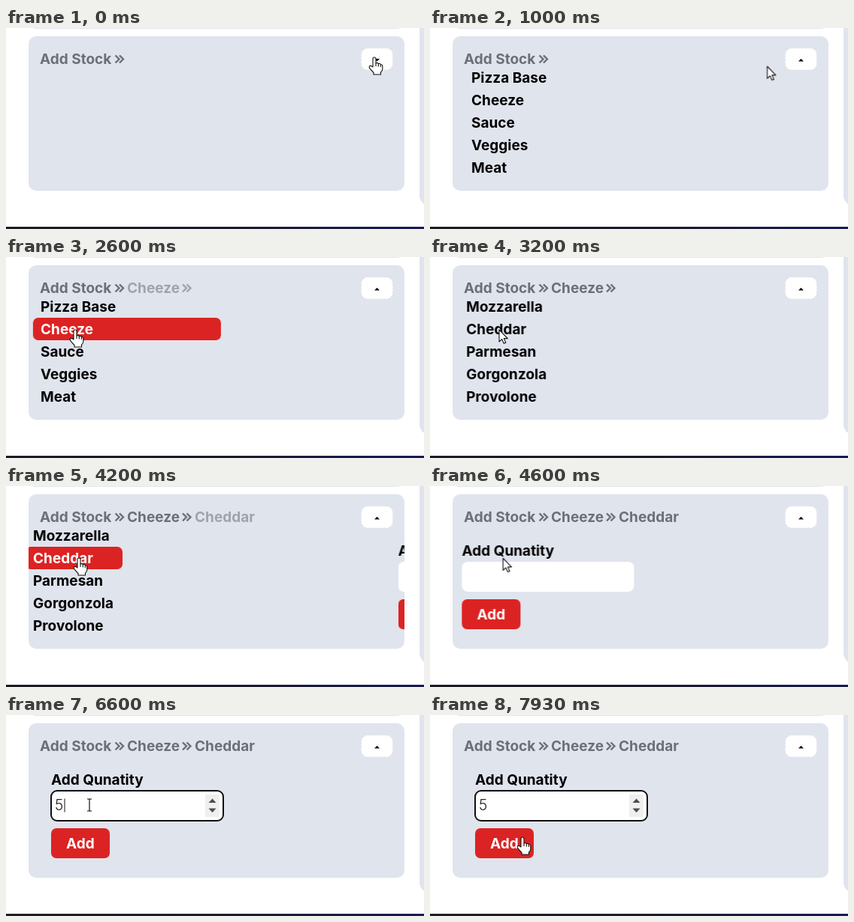
An HTML page for the animation above (8 s loop, 556 by 268 pixels).

```html
<!DOCTYPE html>
<html lang="en">
<head>
<meta charset="utf-8">
<title>Add stock</title>
<style>
  html, body { margin: 0; width: 100%; height: 100%; overflow: hidden; background: #fff; }
  svg { display: block; width: 556px; height: 268px; }
  text { font: 700 19px Inter, "Open Sans", sans-serif; }
  .crumb { fill: #6c6f79; }
  .chevron { fill: none; stroke: #6c6f79; stroke-width: 2.4; }
  .red { fill: #dc2323; }
  .light { fill: #fff; }
  .cursor { fill: #fff; stroke: #111; stroke-width: 1.1; stroke-linejoin: round; }
</style>
</head>
<body>
<svg viewBox="0 0 556 268">
  <defs>
    <linearGradient id="footer">
      <stop offset="0" stop-color="#1d1b22"/>
      <stop offset=".55" stop-color="#1b1a2c"/>
      <stop offset="1" stop-color="#171a55"/>
    </linearGradient>
    <clipPath id="card"><rect x="30" y="11" width="500" height="206" rx="10"/></clipPath>
  </defs>

  <g fill="#e0e4ed">
    <rect x="30" y="-40" width="500" height="41" rx="10"/>
    <rect x="550" y="-40" width="60" height="277" rx="14"/>
    <rect x="30" y="11" width="500" height="206" rx="10"/>
  </g>
  <rect y="265" width="556" height="3" fill="url(#footer)"/>

  <g class="crumb">
    <text x="45" y="48">Add Stock</text>
    <path class="chevron" d="M145.500 36.500l5 5-5 5m5.500-10l5 5-5 5"/>
    <g id="crumb2">
      <text x="161" y="48">Cheeze</text>
      <path class="chevron" d="M235 36.500l5 5-5 5m5.500-10l5 5-5 5"/>
    </g>
    <text id="crumb3" x="251" y="48">Cheddar</text>
  </g>

  <rect x="473" y="27.500" width="41" height="28" rx="8" fill="#fff" stroke="#fff" stroke-dasharray="3 2"/>
  <path id="down" d="M490 41h7l-3.500 3.500z"/>
  <path id="up" d="M490 44.500h7l-3.500-3.500z"/>

  <g clip-path="url(#card)">
    <g id="kinds"></g>
    <g id="cheeses"></g>
    <g id="form">
      <text x="60" y="92.500">Add Qunatity</text>
      <rect x="60" y="101" width="229" height="40" rx="8" fill="#fff"/>
      <g id="spinner">
        <rect x="265" y="106" width="19" height="30" fill="#efefef"/>
        <path d="M269.500 117h10l-5-5.500zM269.500 124.500h10l-5 5.500z" fill="#4d4d4d"/>
      </g>
      <rect id="ring" x="60" y="101" width="229" height="40" rx="8" fill="none" stroke="#101010" stroke-width="2"/>
      <text id="digit" x="65" y="127" style="font-weight:300;font-size:19.500px" fill="#222">5</text>
      <path id="caret" d="M0 111.500v18" stroke="#111"/>
      <rect class="red" x="60" y="151" width="78" height="40" rx="7"/>
      <text class="light" x="80" y="178">Add</text>
    </g>
  </g>

  <g id="pointer">
    <g id="hand" class="cursor">
      <path d="M-2 13V2Q-2 0 0 0Q2 0 2 2V8Q4.700 6.800 5.300 8.800Q7.800 7.800 8.300 9.800Q10.800 9.300 10.800 12V16Q10.500 18.500 8.500 20V23H-1V20.500Q-3.500 18-6.500 14.300Q-7.500 11.300-5 11.300Q-3.300 11.800-2 13Z"/>
      <path fill="none" d="M2 8v4M5.300 9v3.500M8.300 10v3"/>
    </g>
    <path id="arrow" class="cursor" d="M0 0V16L3.700 12.600L6.200 18.300L8.800 17.200L6.300 11.600H11.300Z"/>
    <path id="beam" d="M-3-8h2.300l.7.700.7-.7H3M0-7.500v15M-3 8h2.300l.7-.7.7.7H3" fill="none" stroke="#111" stroke-width="1.200"/>
  </g>
</svg>

<script>
const LOOP = 8000;
const byId = id => document.getElementById(id);

// Steps are [ms, value, easing?]; the last value holds to the end of the loop.
function track(id, prop, steps, easing = 'linear') {
  const last = steps[steps.length - 1];
  const frames = [...steps, [LOOP, last[1]]].map(([ms, value, ease]) =>
    ({ offset: ms / LOOP, [prop]: value, easing: ease || easing }));
  byId(id).animate(frames, { duration: LOOP, iterations: Infinity });
}

// Visible only inside the given [from, to] spans.
function show(id, ...spans) {
  const steps = spans.flatMap(([from, to]) => [[from, 1], [to, 0]]);
  if (steps[0][0] > 0) steps.unshift([0, 0]);
  track(id, 'opacity', steps.filter(([ms]) => ms < LOOP), 'step-end');
}

const move = (id, steps) => track(id, 'transform',
  steps.map(([ms, x, y, ease]) => [ms, `translate(${x}px, ${y}px)`, ease]));
const slide = (id, steps) => move(id, steps.map(([ms, x, ease]) => [ms, x, 0, ease]));

function fillList(id, names, width) {
  byId(id).innerHTML = names.map((name, i) => {
    const y = 51 + 30 * i;
    const label = `<text x="55" y="${y + 22}">${name}</text>`;
    return `${label}<g id="${name}" class="light" opacity="0">
      <rect class="red" x="45" y="${y}" width="${width}" height="30" rx="7"/>${label}</g>`;
  }).join('');
}

fillList('kinds', ['Pizza Base', 'Cheeze', 'Sauce', 'Veggies', 'Meat'], 250);
fillList('cheeses', ['Mozzarella', 'Cheddar', 'Parmesan', 'Gorgonzola', 'Provolone'], 129);

const OUT = 'cubic-bezier(.2,.6,.4,1)', SOFT = 'ease-in-out';

slide('kinds', [[0, 500], [250, 500, SOFT], [640, -5, SOFT], [850, 0],
  [2540, 0], [2600, -8, 'cubic-bezier(.3,.2,.4,1)'], [2900, -500]]);
slide('cheeses', [[0, 500], [2560, 500, SOFT], [3010, -20, SOFT], [3200, -7, OUT], [3330, 0],
  [4130, 0], [4200, -18, 'cubic-bezier(.3,.2,.4,1)'], [4500, -500]]);
slide('form', [[0, 500], [4130, 500], [4200, 465, OUT], [4620, -18, SOFT], [4900, 0]]);

track('crumb2', 'opacity', [[0, 0], [2500, 0], [2600, .55], [2740, 1]]);
track('crumb3', 'opacity', [[0, 0], [4100, 0], [4200, .55], [4340, 1]]);
show('down', [0, 200]);
show('up', [200, LOOP]);

show('Cheeze', [1230, 1330], [2110, 2900]);
show('Sauce', [1330, 1500], [2000, 2110]);
show('Veggies', [1500, 2000]);
show('Cheddar', [3420, 4500]);

show('spinner', [4950, LOOP]);
show('ring', [5550, LOOP]);
show('digit', [6400, LOOP]);
show('caret', [5550, 6050], [6400, 6900], [7400, 7900]);
track('caret', 'transform', [[0, 'translate(66px)'], [6400, 'translate(78px)']], 'step-end');

move('pointer', [[0, 490, 39], [800, 490, 39, SOFT], [1700, 86, 158], [1870, 86, 158, SOFT],
  [2250, 92, 97], [3380, 92, 97, SOFT], [3560, 97, 96], [4550, 97, 96, SOFT],
  [5150, 111, 120], [7350, 111, 120, SOFT], [7880, 123, 163]]);
show('hand', [0, 920], [1230, 2860], [3420, 4480], [7720, LOOP]);
show('arrow', [920, 1230], [2860, 3420], [4480, 4750], [7620, 7720]);
show('beam', [4750, 7620]);
</script>
</body>
</html>
```
